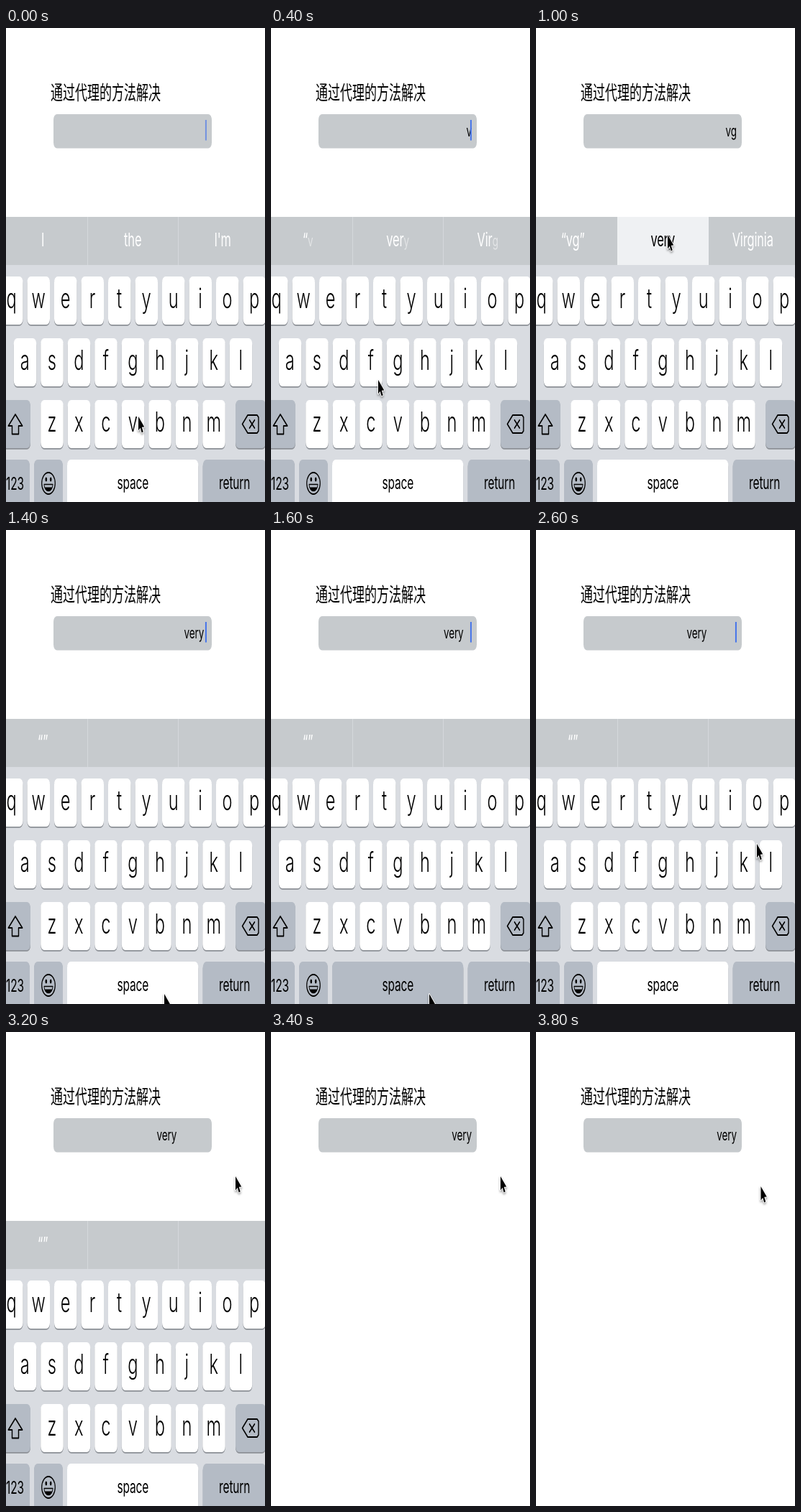
Animation, 360 px wide and 660 px high, one loop 4 s. Source, as an HTML page with a canvas:

```html
<!DOCTYPE html>
<html lang="zh">
<head>
<meta charset="utf-8">
<title>Keyboard input</title>
<style>
html, body { margin: 0; width: 100%; height: 100%; overflow: hidden; background: #fff; }
canvas { display: block; width: 360px; height: 660px; }
</style>
</head>
<body>
<canvas id="stage"></canvas>
<script>
const W = 360, H = 660, LOOP = 4000, STEP = 200;
const TALL = 1.593; // the whole screen is stretched vertically
const INTER = 'Inter, Roboto, sans-serif';
const CJK = '"Noto Sans CJK SC", "Noto Sans CJK", sans-serif';
const GREY = '#c6cacd', DARK_KEY = '#b4bbc5';
const PITCH = 37.5, ROW = 86;

// Moments of the story, in ms
const PRESS_V = 390, PRESS_G = 590, PICK = 1000, ACCEPT = 1190;
const HOLD = 1500, RELEASE = 2520, CLOSE = 3400;

const HINTS = {
  '': ['I', 'the', "I'm"],
  v: ['“v', 'very', 'Virg'],
  vg: ['“vg”', 'very', 'Virginia'],
  very: ['“”', '', '']
};

// Pointer stops: time, x, y
const PATH = [
  [0, 184, 541], [200, 177, 578], [400, 149, 490], [600, 176, 470],
  [1000, 183, 288], [1200, 220, 646], [2400, 220, 646], [2600, 307, 437],
  [3000, 319, 201], [3600, 319, 201], [3800, 312.5, 215]
];

const canvas = document.getElementById('stage');
const ctx = canvas.getContext('2d');
const dpr = window.devicePixelRatio || 1;
canvas.width = W * dpr;
canvas.height = H * dpr;

const clamp = (v, lo, hi) => Math.min(hi, Math.max(lo, v));
const easeOut = p => 1 - (1 - p) ** 3;

function typedAt(t) {
  if (t < PRESS_V) return '';
  if (t < PRESS_G) return 'v';
  return t < ACCEPT ? 'vg' : 'very';
}

// One space follows the accepted word, then the held key repeats
function spacesAt(t) {
  if (t < ACCEPT || t >= CLOSE) return 0;
  return 1 + Math.round(clamp((t - 1400) / 117, 0, 10));
}

// The caret is solid after an edit and then fades
function caretAt(t) {
  const edits = [-265, PRESS_V, PRESS_G, ACCEPT];
  const last = t < HOLD ? edits.filter(e => e <= t).pop() : Math.min(t, RELEASE);
  return clamp((330 - (t - last)) / 100, 0, 1);
}

function pointerAt(t) {
  const i = PATH.findLastIndex(p => p[0] <= t);
  const [t0, x0, y0] = PATH[i];
  const [t1, x1, y1] = PATH[i + 1] || [LOOP, x0, y0];
  const p = easeOut((t - t0) / (t1 - t0));
  return [x0 + (x1 - x0) * p, y0 + (y1 - y0) * p];
}

function setFont(size, weight = 400) {
  ctx.font = `${weight} ${size * .965}px ${INTER}`;
  ctx.letterSpacing = `${-size * .007}px`;
}

function text(s, x, y, color = '#000', align = 'center') {
  ctx.save();
  ctx.translate(x, y);
  ctx.scale(1, TALL);
  ctx.textAlign = align;
  ctx.fillStyle = color;
  ctx.fillText(s, 0, 0);
  ctx.restore();
}

function box(x, y, w, h, color) {
  ctx.beginPath();
  ctx.roundRect(x, y, w, h, { x: 5, y: 8 });
  ctx.fillStyle = color;
  ctx.fill();
}

function key(x, y, w, color = '#fff') {
  box(x, y + 1.8, w, 67, '#8c9096');
  box(x, y, w, 67, color);
}

function poly(points, close = true) {
  ctx.beginPath();
  points.forEach(([x, y]) => ctx.lineTo(x, y));
  if (close) ctx.closePath();
}

function strokeTall(width) {
  ctx.save();
  ctx.scale(1, TALL);
  ctx.lineWidth = width;
  ctx.lineJoin = ctx.lineCap = 'round';
  ctx.strokeStyle = '#000';
  ctx.stroke();
  ctx.restore();
}

function shiftIcon() {
  poly([[13, 538], [22.7, 554], [17.5, 554], [17.5, 565.5], [8.5, 565.5], [8.5, 554], [3.3, 554]]);
  strokeTall(1.4);
}

function deleteIcon() {
  poly([[328.5, 551.5], [336, 539], [349, 539], [351, 542], [351, 561], [349, 564], [336, 564]]);
  strokeTall(1.4);
  poly([[338.5, 546], [345.5, 557]], false);
  ctx.moveTo(345.5, 546);
  ctx.lineTo(338.5, 557);
  strokeTall(1.4);
}

function ellipse(x, y, rx, ry, from = 0, to = Math.PI * 2) {
  ctx.beginPath();
  ctx.ellipse(x, y, rx, ry, 0, from, to);
  ctx.closePath();
}

function smileIcon() {
  ctx.fillStyle = '#000';
  ellipse(59, 634, 9.3, 15);
  strokeTall(1.2);
  for (const side of [-1, 1]) {
    ellipse(59 + side * 3.2, 628.5, 1.3, 2.9);
    ctx.fill();
  }
  ellipse(59, 635.5, 6, 9, 0, Math.PI);
  strokeTall(.9);
  ellipse(59, 635.5, 6, 9, .45, Math.PI - .45);
  ctx.fill();
}

// The newest letter of a fresh suggestion is still faint and small
function hint(word, center, color, fresh) {
  const cut = fresh ? word.length - 1 : word.length;
  const parts = [[word.slice(0, cut), 1, 17], [word.slice(cut), .5, 14]];
  const widths = parts.map(([s, , size]) => {
    setFont(size);
    return ctx.measureText(s).width;
  });
  let x = center - (widths[0] + widths[1]) / 2;
  parts.forEach(([s, alpha, size], i) => {
    setFont(size);
    ctx.globalAlpha = alpha;
    text(s, x, 303.5, color, 'left');
    x += widths[i];
  });
  ctx.globalAlpha = 1;
}

function suggestions(t) {
  const picked = t >= PICK && t < ACCEPT;
  const typed = typedAt(t);
  const fresh = t > 0 && typed !== typedAt(t - STEP);
  ctx.fillStyle = GREY;
  ctx.fillRect(0, 263, W, 67);
  ctx.fillStyle = '#d5d8dc';
  ctx.fillRect(113, 263, 1, 67);
  ctx.fillRect(239, 263, 1, 67);
  if (picked) {
    ctx.fillStyle = '#eff1f3';
    ctx.fillRect(113, 263, 127, 67);
  }
  HINTS[typed].forEach((word, i) =>
    hint(word, 51.2 + i * 125, picked && i === 1 ? '#000' : '#fff', fresh));
}

function letterKeys() {
  setFont(24.5, 350);
  ['qwertyuiop', 'asdfghjkl', 'zxcvbnm'].forEach((row, r) => {
    const y = 346 + r * ROW;
    const left = 176.5 - (row.length * PITCH - 6) / 2;
    [...row].forEach((letter, i) => {
      const x = left + i * PITCH;
      key(x, y, 31.5);
      text(letter, x + 15.5, y + 44);
    });
  });
}

function keyboard(t) {
  ctx.fillStyle = '#d9dce1';
  ctx.fillRect(0, 330, W, H - 330);
  suggestions(t);
  letterKeys();
  key(-8, 518, 42, DARK_KEY);
  key(319, 518, 42, DARK_KEY);
  key(-8, 601, 41, DARK_KEY);
  key(39, 601, 40, DARK_KEY);
  key(85, 601, 182.3, t >= HOLD && t < RELEASE ? DARK_KEY : '#fff');
  key(273.7, 601, 87.5, DARK_KEY);
  shiftIcon();
  deleteIcon();
  smileIcon();
  setFont(16);
  text('123', 12.5, 643);
  text('space', 176.3, 642);
  text('return', 317.7, 642);
}

function field(t) {
  box(66, 120, 220, 47.5, GREY);
  setFont(14);
  text(typedAt(t), 279 - spacesAt(t) * 3.8, 150.8, '#000', 'right');
  ctx.globalAlpha = caretAt(t);
  ctx.fillStyle = '#4574ea';
  ctx.fillRect(276.9, 128, 2, 28.5);
  ctx.globalAlpha = 1;
}

function pointer(t) {
  ctx.save();
  ctx.translate(...pointerAt(t));
  poly([[0, 0], [0, 19.5], [2.7, 15.8], [4.7, 22.5], [6.7, 21.2], [4.8, 14.8], [8.3, 14.6]]);
  ctx.lineJoin = 'round';
  ctx.lineWidth = 1.8;
  ctx.strokeStyle = '#fff';
  ctx.shadowColor = 'rgba(0,0,0,.4)';
  ctx.shadowBlur = 3 * dpr;
  ctx.shadowOffsetY = 2 * dpr;
  ctx.stroke();
  ctx.shadowColor = 'transparent';
  ctx.fillStyle = '#000';
  ctx.fill();
  ctx.restore();
}

function draw(time) {
  const t = Math.floor((time % LOOP) / STEP) * STEP;
  ctx.setTransform(dpr, 0, 0, dpr, 0, 0);
  ctx.fillStyle = '#fff';
  ctx.fillRect(0, 0, W, H);
  ctx.font = `400 17px ${CJK}`;
  ctx.letterSpacing = '0px';
  text('通过代理的方法解决', 62, 100, '#000', 'left');
  field(t);
  if (t < CLOSE) keyboard(t);
  pointer(t);
}

const start = performance.now();
function tick() {
  draw(performance.now() - start);
  requestAnimationFrame(tick);
}
tick();
</script>
</body>
</html>
```
